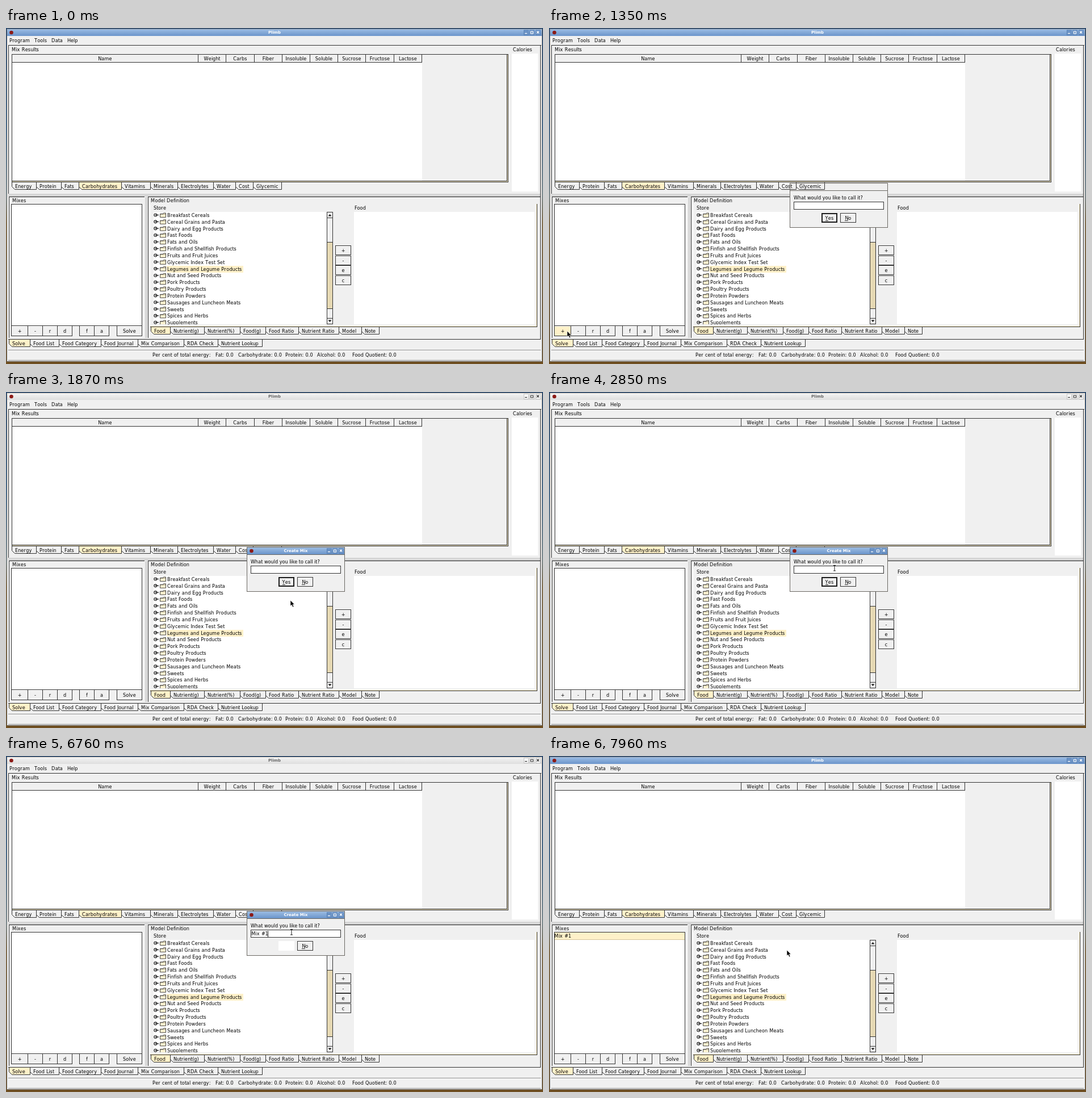
Animation, 946 px wide and 592 px high, one loop 8000 ms. Source, as an HTML page:

```html
<!DOCTYPE html>
<html lang="en">
<head>
<meta charset="utf-8">
<title>Mix planner</title>
<style>
html, body { margin: 0; width: 100%; height: 100%; overflow: hidden; }
svg { display: block; width: 946px; height: 592px; }
text { font: 8.13px "DejaVu Sans", sans-serif; font-variant-ligatures: none; white-space: pre; }
.title { font-weight: bold; font-size: 6.95px; text-anchor: middle; }
rect, .frame { shape-rendering: crispEdges; }
</style>
</head>
<body>
<svg id="stage" viewBox="0 0 946 592"></svg>
<script>
const LOOP = 8000;
const INK = '#1c1c1c', LINE = '#333', PANEL = '#f0f0f0', CREAM = '#fef1c9', EDGE = '#6a6762';
const SCALE = 946 / 1280, FONT = 11;

const pen = document.createElement('canvas').getContext('2d');
pen.font = '110px "DejaVu Sans", sans-serif';

// Glyphs sit on whole pixels of the unscaled 1280-pixel desktop.
function glyphStops(str) {
  const stops = [0];
  for (const ch of str) {
    const advance = Math.round(pen.measureText(ch).width * FONT / 110 + 0.05);
    stops.push(stops[stops.length - 1] + advance);
  }
  return stops.map(v => v * SCALE);
}
const textWidth = str => glyphStops(str).pop();
const xList = (x, str) => glyphStops(str).slice(0, -1).map(v => (x + v).toFixed(2)).join(' ');

const text = (x, y, str) => `<text x="${xList(x, str)}" y="${y}">${str}</text>`;
const centered = (cx, y, str) => text(cx - textWidth(str) / 2, y, str);
const fill = (x, y, w, h, color, extra = '') =>
  `<rect x="${x}" y="${y}" width="${w}" height="${h}" fill="${color}" ${extra}/>`;
const box = (x, y, w, h, color, stroke = LINE, extra = '') =>
  fill(x + 0.5, y + 0.5, w - 1, h - 1, color, `stroke="${stroke}" ${extra}`);
const hline = (x1, x2, y, color = LINE) => fill(x1, y, x2 - x1, 1, color);
const vline = (x, y1, y2, color = LINE) => fill(x, y1, 1, y2 - y1, color);
const group = (id, body) => `<g id="${id}">${body}</g>`;

function button(x, y, w, h, label, id = '') {
  return box(x, y, w, h, PANEL, LINE, `id="${id}"`) +
    hline(x + 1, x + w - 1, y + 1, '#fff') + centered(x + w / 2, y + h / 2 + 3, label);
}

// Each tab is [textX, label]; it reaches to where the next one begins.
function tabs(top, selected, list) {
  return list.map(([textX, label], i) => {
    const left = textX - 5.5;
    const right = i + 1 < list.length ? list[i + 1][0] - 5.5 : Math.round(textX + textWidth(label)) + 6.5;
    return `<path d="M${left} ${top}v7.5l5 5H${right}V${top}" fill="${label === selected ? CREAM : PANEL}" stroke="${LINE}"/>` +
      text(textX, top + 9.8, label);
  }).join('');
}

function titleBar(x, y, w, label, active, buttons) {
  const glyph = active ? '#fff' : '#333';
  const face = active ? '#6b93c6' : '#f8f8f8';
  const controls = buttons.map((cx, i) => {
    const left = cx - 4, top = y + 1.5;
    const mark = [
      `M${left + 2} ${top + 6}h4`,
      `M${left + 2} ${top + 2.5}h4v4h-4z`,
      `M${left + 2} ${top + 2}l4 4m0-4l-4 4`][i];
    return fill(left, top, 8, 8.5, face, `stroke="${active ? '#4e76aa' : '#aaa'}" stroke-width=".6"`) +
      `<path d="${mark}" fill="none" stroke="${glyph}" stroke-width="1.2"/>`;
  }).join('');
  return fill(x, y, w, 12, active ? 'url(#active)' : 'url(#idle)') +
    `<circle cx="${x + 7.5}" cy="${y + 6}" r="3.3" fill="#8c1a16"/>` +
    `<text class="title" x="${x + w / 2}" y="${y + 8.3}" fill="${active ? '#fff' : '#666'}">${label}</text>` + controls;
}

const gradient = (id, ...stops) => `<linearGradient id="${id}" x2="0" y2="1">` +
  stops.map(([at, color]) => `<stop offset="${at}" stop-color="${color}"/>`).join('') + '</linearGradient>';
const dots = (id, back, dot) => `<pattern id="${id}" width="2" height="2" patternUnits="userSpaceOnUse">` +
  fill(0, 0, 2, 2, back) + fill(0, 0, 1, 1, dot) + fill(1, 1, 1, 1, dot) + '</pattern>';

const defs = `<defs>${
  gradient('desk', [0, '#103f78'], [0.3, '#2b6aa8'], [0.5, '#8fa9b4'], [0.58, '#94713a'], [1, '#6f4f22'])}${
  gradient('active', [0, '#9dbde3'], [1, '#6b95cb'])}${
  gradient('idle', [0, '#f4f4f4'], [1, '#dedede'])}${
  dots('grip', '#f4f4f4', '#b8b8b8')}${dots('thumb', '#fff3cf', '#cdbf98')}
  <clipPath id="treeClip">${fill(260, 324, 305, 198, '#000')}</clipPath></defs>`;

function resultsPane() {
  const edges = [10, 338, 387, 437, 486, 535, 584, 633, 683, 732];
  const names = ['Name', 'Weight', 'Carbs', 'Fiber', 'Insoluble', 'Soluble', 'Sucrose', 'Fructose', 'Lactose'];
  const cells = names.map((name, i) => {
    const x = edges[i], w = edges[i + 1] - x + 1;
    return box(x, 46, w, 15, PANEL) + centered(x + w / 2, 56.5, name);
  }).join('');
  return hline(4, 943, 30) + vline(4, 30, 292) +
    text(10, 41, 'Mix Results') + text(893, 41, 'Calories') +
    fill(891, 45, 46, 243, '#fff') +
    box(10, 46, 875, 226, CREAM) + box(10, 46, 873, 224, PANEL) +
    fill(11, 60, 722, 209, '#fff') + cells +
    tabs(272, 'Carbohydrates', [
      [16, 'Energy'], [59, 'Protein'], [103, 'Fats'], [134, 'Carbohydrates'], [209, 'Vitamins'],
      [260, 'Minerals'], [308, 'Electrolytes'], [371, 'Water'], [410, 'Cost'], [441, 'Glycemic']]);
}

function mixesPane() {
  const buttons = [[9, 30, '+'], [38, 27, '-'], [64, 27, 'r'], [90, 27, 'd'],
    [129, 27, 'f'], [155, 27, 'a'], [195, 45, 'Solve']];
  return fill(4, 292, 938, 5, 'url(#grip)') + fill(245, 298, 4, 248, 'url(#grip)') +
    fill(5, 297, 239, 1, INK) + vline(5, 297, 546) + text(11, 307, 'Mixes') +
    box(9, 310, 231, 215, '#fff') +
    group('mixRow', fill(10, 311, 229, 12, CREAM) + hline(10, 239, 323, '#d6c59a') + text(9.5, 320, 'Mix #1')) +
    buttons.map(([x, w, label]) => button(x, 524, w, 19, label, label === '+' ? 'addMix' : '')).join('');
}

function tree() {
  const names = ['Breakfast Cereals', 'Cereal Grains and Pasta', 'Dairy and Egg Products', 'Fast Foods',
    'Fats and Oils', 'Finfish and Shellfish Products', 'Fruits and Fruit Juices', 'Glycemic Index Test Set',
    'Legumes and Legume Products', 'Nut and Seed Products', 'Pork Products', 'Poultry Products',
    'Protein Powders', 'Sausages and Luncheon Meats', 'Sweets', 'Spices and Herbs', 'Supplements'];
  const rows = names.map((name, i) => {
    const y = 330 + i * 16 * SCALE;
    const mark = name.startsWith('Legumes') ? fill(283, y - 5.5, 135, 11.5, CREAM) : '';
    return mark + `<circle cx="263.3" cy="${y - 0.5}" r="2.5" fill="#fff" stroke="${INK}" stroke-width="1.1"/>` +
      `<path d="M262.5 ${y - 0.5}h6.5" stroke="${INK}" stroke-width="1.3"/>` +
      `<path d="M271.5 ${y + 3.5}v-6h5l1-1.5h4v7.5z" fill="#fff3d0" stroke="${LINE}" stroke-width=".9"/>` +
      `<path d="M272 ${y - 2}h9" stroke="${LINE}" stroke-width=".6"/>` + text(284, y + 3, name);
  }).join('');
  return fill(260, 324, 305, 198, '#fff') + `<g clip-path="url(#treeClip)">${rows}</g>`;
}

function modelPane() {
  const scrollbar = box(565, 324, 11, 198, PANEL) + box(565, 324, 11, 11, PANEL) + box(565, 511, 11, 11, PANEL) +
    box(565, 377, 11, 118, 'url(#thumb)') +
    `<path d="M567.5 331.5h6l-3-3.5zM567.5 514.5h6l-3 3.5z" fill="${INK}"/>`;
  return fill(250, 297, 692, 1, INK) + vline(250, 297, 546) + text(255, 307, 'Model Definition') +
    vline(254, 311, 526, '#fff') + vline(935, 310, 527) + vline(934, 310, 526, CREAM) +
    hline(254, 936, 526) + hline(254, 935, 525, CREAM) +
    text(260, 320, 'Store') + text(614, 320, 'Food') + tree() + scrollbar +
    fill(613, 324, 318, 198, '#fff') +
    ['+', '-', 'e', 'c'].map((c, i) => button(580, Math.round(383 + i * 17.7), 28, 17, c)).join('') +
    tabs(527, 'Food', [
      [261, 'Food'], [295, 'Nutrient(g)'], [355, 'Nutrient(%)'], [418, 'Food(g)'],
      [463, 'Food Ratio'], [521, 'Nutrient Ratio'], [592, 'Model'], [632, 'Note']]);
}

function footer() {
  const status = [[258, 'Per cent of total energy:'], [369, 'Fat: 0.0'], [409, 'Carbohydrate: 0.0'],
    [492, 'Protein: 0.0'], [548, 'Alcohol: 0.0'], [610, 'Food Quotient: 0.0']];
  return hline(4, 942, 548) + vline(941, 30, 549) +
    tabs(549, 'Solve', [
      [11, 'Solve'], [48, 'Food List'], [99, 'Food Category'], [173, 'Food Journal'],
      [238, 'Mix Comparison'], [319, 'RDA Check'], [379, 'Nutrient Lookup']]) +
    hline(4, 942, 567, '#8c8c8c') + hline(4, 942, 568, '#fff') +
    status.map(([x, s]) => text(x, 579, s)).join('') +
    hline(4, 942, 585, '#8c8c8c');
}

function dialog() {
  return fill(424, 286, 173, 66, PANEL) +
    `<path class="frame" d="M424.5 273.5h172v78h-172zM424 286.5h173" fill="none" stroke="${EDGE}"/>` +
    group('dialogTitle', titleBar(425, 274, 171, 'Create Mix', true, [569, 579.5, 590])) +
    '<text x="431" y="301.7">What would you like to call it?</text>' +
    box(431, 306, 159, 14, '#fff') + '<text id="entry" y="316.2"></text>' +
    fill(432, 308, 1, 11, INK, 'id="caret"') +
    button(513, 326, 28, 17, 'No') + hline(521, 527, 339) +
    group('yes', button(480, 326, 28, 17, 'Yes') + hline(487, 492, 339) +
      fill(481, 327, 26, 15, 'none', `stroke="${INK}" stroke-width="2"`)) +
    fill(480, 326, 28, 17, '#fff', 'id="yesPressed"');
}

const stage = document.getElementById('stage');
const mainTitle = active => titleBar(2, 2, 942, 'Plimb', active, [916, 926.5, 937]);
stage.innerHTML = defs + fill(0, 0, 946, 592, 'url(#desk)') +
  box(1, 1, 944, 587, PANEL, EDGE) +
  group('titleOn', mainTitle(true)) + group('titleOff', mainTitle(false)) +
  text(6, 25, 'Program') + text(50, 25, 'Tools') + text(80, 25, 'Data') + text(108, 25, 'Help') +
  resultsPane() + mixesPane() + modelPane() + footer() + group('dialog', dialog()) +
  group('arrow', '<path d="M0 0V10L2.3 8L4.2 12L6 11.2L4.2 7.3H7.2Z" fill="#000" stroke="#fff" stroke-width=".6"/>') +
  group('beam', `<path d="M-2 -4.5H2M0 -4.5V5M-2 5H2" stroke="${INK}" fill="none"/>`);

const el = id => document.getElementById(id);
const show = (id, on) => el(id).setAttribute('display', on ? 'inline' : 'none');
const within = (t, a, b) => t >= a && t < b;

const POINTER = [[500, 241, 488], [620, 190, 500], [760, 110, 516], [900, 50, 531], [1020, 32, 534],
  [1440, 32, 534], [1600, 200, 490], [1740, 400, 415], [1870, 501, 367], [1950, 503, 345], [2030, 500, 326],
  [2330, 503, 310], [7480, 503, 310], [7550, 509, 311], [7760, 509, 311], [7800, 497, 304], [7960, 419, 342]];
const KEYS = [4270, 5430, 5550, 5810, 6260, 6410];
const CARET_ON = [[2190, 2850], [3400, 3830], [4270, 4790], [5290, 6820]];

function pointerAt(t) {
  const next = POINTER.findIndex(p => p[0] > t);
  if (next < 0) return POINTER[POINTER.length - 1].slice(1);
  if (next === 0) return POINTER[0].slice(1);
  const [t0, x0, y0] = POINTER[next - 1], [t1, x1, y1] = POINTER[next];
  const k = (t - t0) / (t1 - t0);
  return [x0 + (x1 - x0) * k, y0 + (y1 - y0) * k];
}

function render(t) {
  const focused = within(t, 1420, 6820);
  show('titleOn', !focused);
  show('titleOff', focused);
  show('dialog', within(t, 1350, 6820));
  show('dialogTitle', focused);
  show('mixRow', t >= 6820);
  show('yes', t < 6760);
  show('yesPressed', t >= 6760);
  el('addMix').setAttribute('fill', within(t, 1230, 1420) ? CREAM : PANEL);

  const typed = 'Mix #1'.slice(0, KEYS.filter(k => k <= t).length);
  el('entry').textContent = typed;
  el('entry').setAttribute('x', xList(432.2, typed) || 432);
  el('caret').setAttribute('x', Math.floor(432.2 + textWidth(typed)));
  show('caret', CARET_ON.some(([a, b]) => within(t, a, b)));

  const [x, y] = pointerAt(t).map(Math.round);
  const beam = within(t, 2170, 7510);
  show('beam', beam);
  show('arrow', t >= 500 && !beam);
  el(beam ? 'beam' : 'arrow').setAttribute('transform', `translate(${x} ${y})`);
}

const start = performance.now();
function tick() {
  render((performance.now() - start) % LOOP);
  requestAnimationFrame(tick);
}
tick();
</script>
</body>
</html>
```
